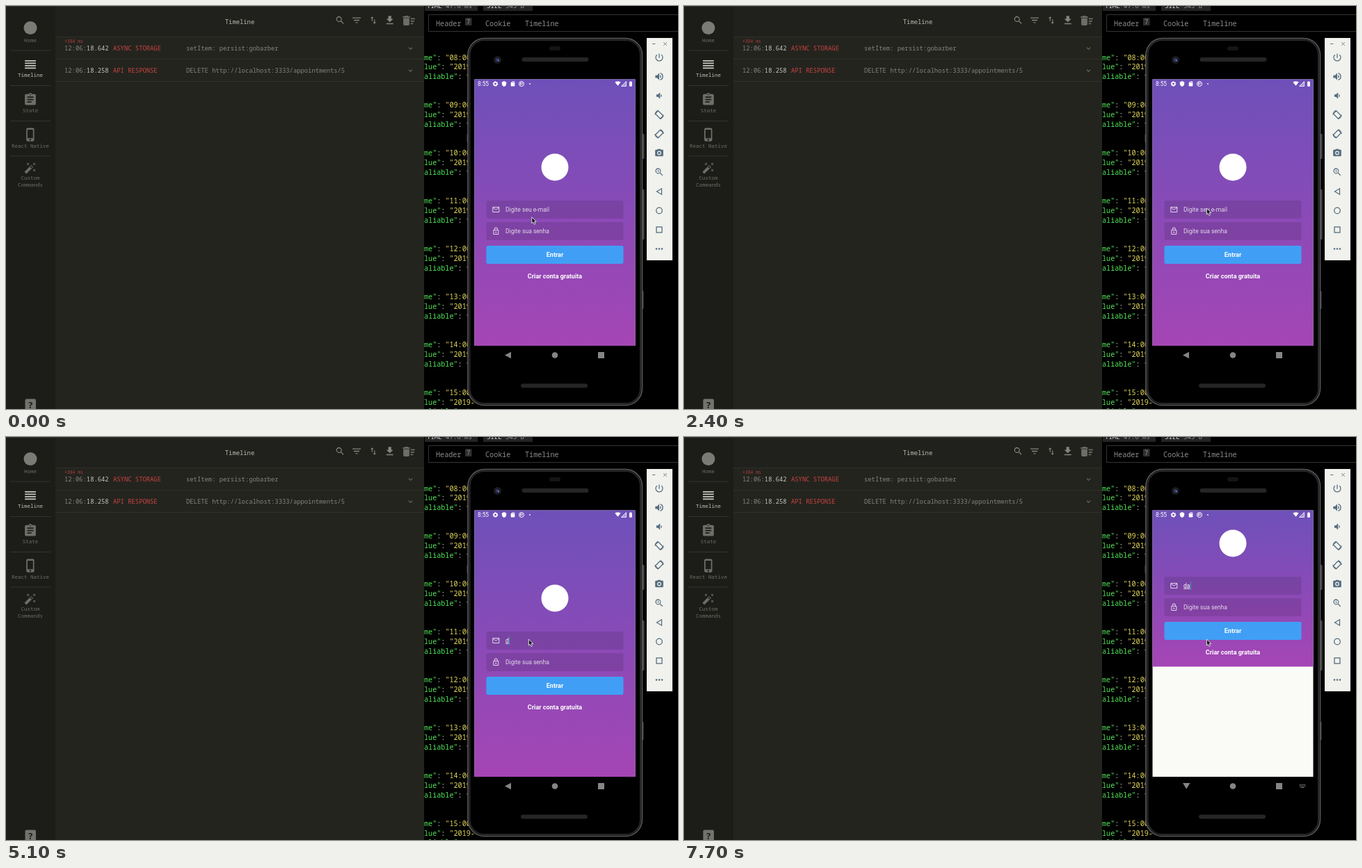
Write an HTML page that moves like this. It is 966 by 580 pixels and loops after 8000 ms.

```html
<!DOCTYPE html>
<html lang="pt">
<head>
<meta charset="utf-8">
<style>
  html, body { margin: 0; width: 100%; height: 100%; overflow: hidden; background: #000; }
  svg { display: block; }
  text { white-space: pre; }
  .mono { font-family: "Noto Sans Mono", monospace; }
  .app { font-family: Roboto, sans-serif; }
</style>
</head>
<body>
<svg id="stage" width="966" height="580" viewBox="0 0 966 580"></svg>
<script>
const ICONS = {
  search: 'M15.5 14h-.8l-.3-.3A6.5 6.5 0 1 0 13.7 14.4l.3.3v.8l5 5 1.5-1.5zm-6 0a4.5 4.5 0 1 1 0-9 4.5 4.5 0 0 1 0 9z',
  filter: 'M10 18h4v-2h-4zM3 6v2h18V6zm3 7h12v-2H6z',
  sort: 'M16 17v-7h-2v7h-3l4 4 4-4zM9 3L5 7h3v7h2V7h3z',
  download: 'M19 9h-4V3H9v6H5l7 7zM5 18v2h14v-2z',
  clear: 'M15 16h4v2h-4zm0-8h7v2h-7zm0 4h6v2h-6zM3 18a2 2 0 0 0 2 2h6a2 2 0 0 0 2-2V8H3zM14 5h-3l-1-1H6L5 5H2v2h12z',
  lines: 'M3 15h18v-2H3zm0 4h18v-2H3zm0-8h18V9H3zm0-6v2h18V5z',
  clipboard: 'M19 3h-4.2a3 3 0 0 0-5.6 0H5a2 2 0 0 0-2 2v14a2 2 0 0 0 2 2h14a2 2 0 0 0 2-2V5a2 2 0 0 0-2-2zm-7 0a1 1 0 1 1 0 2 1 1 0 0 1 0-2zm2 14H7v-2h7zm3-4H7v-2h10zm0-4H7V7h10z',
  phone: 'M15.5 1h-8A2.5 2.5 0 0 0 5 3.5v17A2.5 2.5 0 0 0 7.500 23h8a2.500 2.500 0 0 0 2.500-2.500v-17A2.500 2.500 0 0 0 15.500 1zm-4 21a1.500 1.500 0 1 1 0-3 1.500 1.500 0 0 1 0 3zM16 18H7V4h9z',
  wand: 'M7.5 5.600L10 7 8.600 4.500 10 2 7.500 3.400 5 2l1.400 2.500L5 7zm12 9.800L17 14l1.400 2.500L17 19l2.500-1.400L22 19l-1.400-2.500L22 14zM22 2l-2.500 1.400L17 2l1.400 2.500L17 7l2.500-1.400L22 7l-1.400-2.500zM14.400 7.300a1 1 0 0 0-1.400 0L1.300 19a1 1 0 0 0 0 1.400l2.300 2.300a1 1 0 0 0 1.400 0L16.700 11a1 1 0 0 0 0-1.400zm-1 5.500l-2.200-2.100 2.500-2.500 2.100 2.100z',
  chevron: 'M16.600 8.600L12 13.200 7.400 8.600 6 10l6 6 6-6z',
  mail: 'M20 4H4a2 2 0 0 0-2 2v12a2 2 0 0 0 2 2h16a2 2 0 0 0 2-2V6a2 2 0 0 0-2-2zm0 14H4V8l8 5 8-5zm-8-7L4 6h16z',
  lock: 'M12 17a2 2 0 1 0 0-4 2 2 0 0 0 0 4zm6-9h-1V6A5 5 0 0 0 7 6v2H6a2 2 0 0 0-2 2v10a2 2 0 0 0 2 2h12a2 2 0 0 0 2-2V10a2 2 0 0 0-2-2zM8.900 6a3.100 3.100 0 0 1 6.200 0v2H8.900zM18 20H6V10h12z',
  power: 'M13 3h-2v10h2zm4.800 2.200l-1.400 1.400A7 7 0 1 1 7.600 6.600L6.200 5.200a9 9 0 1 0 11.600 0z',
  louder: 'M3 9v6h4l5 5V4L7 9zm13.500 3A4.500 4.500 0 0 0 14 8v8a4.500 4.500 0 0 0 2.500-4zM14 3.200v2.100a7 7 0 0 1 0 13.400v2.100a9 9 0 0 0 0-17.600z',
  quieter: 'M18.500 12A4.500 4.500 0 0 0 16 8v8a4.500 4.500 0 0 0 2.500-4zM5 9v6h4l5 5V4L9 9z',
  camera: 'M9 2L7.200 4H4a2 2 0 0 0-2 2v12a2 2 0 0 0 2 2h16a2 2 0 0 0 2-2V6a2 2 0 0 0-2-2h-3.200L15 2zm3 15a5 5 0 1 1 0-10 5 5 0 0 1 0 10zm0-8a3 3 0 1 0 0 6 3 3 0 0 0 0-6z',
  plus: 'M12.500 10H10v2.500H9V10H6.500V9H9V6.500h1V9h2.500z',
  shield: 'M12 1L3 5v6c0 5.600 3.800 10.700 9 12 5.200-1.300 9-6.400 9-12V5z',
  card: 'M18 2h-8L4 8v12a2 2 0 0 0 2 2h12a2 2 0 0 0 2-2V4a2 2 0 0 0-2-2zM10 8V5h2v3zm3 0V5h2v3zm3 0V5h2v3z',
  wifi: 'M12 21.500L23.600 7C19 2.500 5 2.500.4 7z',
  battery: 'M15.700 4H14V2h-4v2H8.300A1.300 1.300 0 0 0 7 5.300v15.400A1.300 1.300 0 0 0 8.300 22h7.400a1.300 1.300 0 0 0 1.300-1.300V5.300A1.300 1.300 0 0 0 15.700 4z'
};

const rect = (x, y, w, h, fill, more = '') =>
  `<rect x="${x}" y="${y}" width="${w}" height="${h}" fill="${fill}" ${more}/>`;
const circle = (x, y, r, fill, more = '') =>
  `<circle cx="${x}" cy="${y}" r="${r}" fill="${fill}" ${more}/>`;
const path = (d, fill, more = '') => `<path d="${d}" fill="${fill}" ${more}/>`;
const text = (x, y, size, fill, body, more = '') =>
  `<text x="${x}" y="${y}" font-size="${size}" fill="${fill}" ${more}>${body}</text>`;
const span = (fill, body, more = '') => `<tspan fill="${fill}" ${more}>${body}</tspan>`;
const icon = (name, x, y, size, fill) =>
  path(ICONS[name], fill, `fill-rule="evenodd" transform="translate(${x} ${y}) scale(${size / 24}) translate(-12 -12)"`);
const middle = 'text-anchor="middle"';

function logPanel() {
  const dim = '#6e6e69', grey = '#85857e', red = '#c9443f';
  const label = (y, body, fill = dim) => text(35, y, 7.5, fill, body, middle);
  const row = (y, seconds, kind, message) =>
    text(84, y, 8.86, grey, '12:06:' + span('#c6c6be', seconds, 'font-weight="500"')) +
    text(154, y, 8.86, red, kind) + text(259, y, 8.86, grey, message) +
    icon('chevron', 581.5, y - 2.5, 12, dim);
  return `<g class="mono">` +
    rect(0, 0, 601, 580, '#24241f') + rect(71, 0, 530, 44, '#20201c') +
    rect(0, 0, 71, 580, '#1c1c18') + rect(0, 0, 601, 1, '#393935') +
    [63.5, 114, 165, 215.5].map(y => rect(6, y, 58, 1, '#34342f')).join('') +
    [44, 76, 108].map(y => rect(71, y, 530, 1, '#2f2f2a')).join('') +
    circle(35, 31.5, 9.5, '#7b7b76') + label(51.5, 'Home') +
    icon('lines', 35, 84, 21, '#c8c8c1') + label(102, 'Timeline', '#c3c3bc') +
    icon('clipboard', 35, 134.5, 21, dim) + label(152.5, 'State') +
    icon('phone', 35.3, 185, 21, dim) + label(203.5, 'React Native') +
    icon('wand', 35, 233, 18, dim) + label(250, 'Custom') + label(260, 'Commands') +
    rect(27.5, 565.5, 15.5, 18, '#73736e', 'rx="2"') +
    text(35.2, 578.5, 13, '#1c1c18', '?', middle + ' font-weight="700"') +
    text(336, 25.5, 8.86, '#bcbcb5', 'Timeline', middle) +
    icon('search', 480.3, 20.500, 15, grey) + icon('filter', 504, 20.500, 16, grey) +
    icon('sort', 528, 20.500, 14, grey) + icon('download', 551.700, 20.500, 17, grey) +
    icon('clear', 579, 21, 21, dim) +
    text(84, 53, 6.4, '#b03f3b', '+384 ms') +
    row(63.5, '18.642', 'ASYNC STORAGE', 'setItem: persist:gobarber') +
    row(95.5, '18.258', 'API RESPONSE', 'DELETE http://localhost:3333/appointments/5') + '</g>';
}

function responsePanel() {
  const line = (y, key, value) =>
    text(601, y, 10.15, '#52e357', key + '"' + span('#d5d5d0', ': ') + span('#e2d65c', value));
  let out = rect(601, 0, 365, 580, '#000') +
    rect(602, -4, 76, 11, '#242424') + rect(686, -4, 71, 11, '#242424') +
    text(605, 2.500, 9, '#ddd', 'TIME ' + span('#999', '47.6 ms')) +
    text(691, 2.500, 9, '#ddd', 'SIZE ' + span('#999', '543 B')) +
    path('M966 12.500H607.500V36.500H966', 'none', 'stroke="#343434"') +
    rect(660, 17, 9.500, 11, '#303030', 'rx="1"') + text(664.700, 25.500, 8, '#999', '7', middle);
  ['Header', 'Cookie', 'Timeline'].forEach((tab, i) =>
    out += text([618, 689, 746][i], 28.500, 10.15, '#8b8b8b', tab));
  for (let i = 0; i < 8; i++) {
    const y = 77.500 + i * 68.900, hour = String(8 + i).padStart(2, '0');
    out += line(y, 'me', `"${hour}:00"`) + line(y + 13.800, 'lue', '"2019-') + line(y + 27.600, 'aliable', 'true');
  }
  return `<g class="mono">${out}</g>`;
}

function phoneBody() {
  return [[914, 184, 36], [914, 264, 72], [913, 410, 26], [662.500, 184, 12]]
      .map(([x, y, h]) => rect(x, y, 3.500, h, '#484848', 'rx="1"')).join('') +
    rect(664, 46.500, 250.500, 528, '#080808', 'rx="24" stroke="#5c5c5c" stroke-width="1.500"') +
    rect(666.500, 49, 245.500, 523, '#000', 'rx="21" stroke="#292929" stroke-width="2"') +
    rect(741.500, 74, 96, 6, '#252525', 'rx="3"') + rect(740, 543.500, 96, 6, '#252525', 'rx="3"') +
    rect(781, 58, 16, 6, '#151515', 'rx="3"') +
    circle(706.500, 77.500, 5.500, '#1b1b22') + circle(706.500, 77.500, 2.500, '#343b70') + circle(708, 78.500, 1, '#8288ad');
}

function statusBar() {
  const white = '#fff';
  return text(678, 115, 8.300, white, '8:55') +
    circle(703.500, 112, 2.300, 'none', 'stroke="#fff" stroke-width="1.600"') +
    circle(703.500, 112, 3.400, 'none', 'stroke="#fff" stroke-dasharray="1.780"') +
    icon('shield', 716, 112, 8.500, white) + icon('card', 728.500, 112, 8.500, white) +
    circle(741, 112, 3.500, 'none', 'stroke="#fff"') +
    path('M739.500 113.500V110.500H741.500A1 1 0 0 1 741.500 112.500H739.500', 'none', 'stroke="#fff" stroke-width=".9"') +
    circle(753, 112, .9, white) + icon('wifi', 879.500, 111.500, 8.500, white) +
    path('M891.500 108.500V115.500H884.500Z', '#fff6', 'stroke="#fff" stroke-width=".8"') + icon('battery', 898, 112, 9, white);
}

function loginForm() {
  const soft = '#ffffffc8';
  const field = (y, name) => rect(690.500, y, 197, 26, '#0000001c', 'rx="2.500"') + icon(name, 704.300, y + 13, 12, soft);
  return `<g id="form">` + circle(789, 232, 19.500, '#fff') +
    field(280, 'mail') + field(311, 'lock') +
    text(718, 295.800, 8.550, soft, '', 'id="email"') +
    rect(718, 287, 1, 12, '#2f9d9b', 'id="caret"') +
    text(718, 327, 8.550, soft, 'Digite sua senha') +
    rect(690.500, 345, 197, 26, '#409ff5', 'rx="2.500"') +
    text(789, 361.300, 9, '#fff', 'Entrar', middle + ' font-weight="700"') +
    text(789, 391.500, 9, '#fff', 'Criar conta gratuita', middle + ' font-weight="700"') + '</g>';
}

function navigation() {
  const grey = '#858585';
  return path('', grey, 'id="back"') + circle(789, 502.500, 4.300, grey) + rect(851, 498, 9, 9, grey) +
    `<g id="keyboard">` + path('M884.500 500.500H893.500M884.500 502.500H893.500', 'none', 'stroke="#858585" stroke-dasharray="1.200 .4"') +
    rect(886.500, 504, 5, 1, grey) + '</g>';
}

function emulatorBar() {
  const ink = '#566d80', stroke = `stroke="${ink}" stroke-width="1.300"`;
  const rotate = (y, flip) => `<g transform="translate(939 ${y}) scale(${flip} 1)" fill="none" ${stroke}>` +
    `<rect x="-3" y="-5" width="6" height="10" rx="1" transform="rotate(-45)"/>` +
    `<path d="M-6 0A6 6 0 0 1-1-6M6 0A6 6 0 0 1 1 6"/></g>`;
  return rect(921, 46, 37, 320, '#f1f2ed') +
    path('M929 54.500H933.500M945.300 52.300L949.700 56.700M949.700 52.300L945.300 56.700', 'none', 'stroke="#777"') +
    icon('power', 939, 74, 15, ink) + icon('louder', 939, 101.500, 15, ink) + icon('quieter', 939, 129, 14, ink) +
    rotate(156.500, 1) + rotate(184, -1) +
    icon('camera', 939, 211.500, 14, ink) + icon('search', 939, 239, 15, ink) + icon('plus', 939, 239, 15, ink) +
    path('M942.500 262.800V271.200L935.500 267Z', 'none', stroke) + circle(939, 294.500, 4.300, 'none', stroke) +
    rect(935, 318, 8, 8, 'none', stroke) + [935, 939, 943].map(x => circle(x, 349.500, 1.300, ink)).join('');
}

stage.innerHTML = `<defs><linearGradient id="violet" x2="0" y2="1">
  <stop stop-color="#6e50b9"/><stop offset="1" stop-color="#a545b5"/></linearGradient></defs>` +
  responsePanel() + logPanel() + phoneBody() + '<g class="app">' +
  rect(673.500, 105.500, 231, 383.500, '#fafbf6') + rect(673.500, 105.500, 231, 383.500, 'url(#violet)', 'id="backdrop"') +
  statusBar() + loginForm() + '</g>' + navigation() + emulatorBar() +
  path('M0 0V9L2 7.200 3.600 10.500 5.200 9.700 3.700 6.500H6.300Z', '#111', 'id="pointer" stroke="#fff" stroke-width=".8"');

const [email, caret, form, backdrop, back, keyboard, pointer] =
  ['email', 'caret', 'form', 'backdrop', 'back', 'keyboard', 'pointer'].map(id => document.getElementById(id));
const CARET_TOGGLES = [800, 1500, 1900, 2400, 2900, 3500, 3900, 4400, 4900, 6900, 7700];

function draw(t) {
  const typed = t < 5100 ? '' : t < 6300 ? 'd' : 'da';
  email.textContent = typed || 'Digite seu e-mail';
  email.setAttribute('fill', typed ? '#fff' : '#ffffffc8');
  email.setAttribute('text-decoration', typed ? 'underline' : 'none');
  caret.setAttribute('x', [718, 723, 728][typed.length]);
  caret.setAttribute('opacity', CARET_TOGGLES.filter(at => t >= at).length % 2);

  const raised = t >= 6900;
  form.setAttribute('transform', `translate(0 ${raised ? -79 : 0})`);
  backdrop.setAttribute('height', raised ? 225 : 383.5);
  keyboard.setAttribute('opacity', t >= 5600 ? 1 : 0);
  back.setAttribute('d', t >= 5800 ? 'M717 498H727.500L722.200 506.500Z' : 'M726 497.700V507.300L717 502.500Z');

  const move = Math.min(1, Math.max(0, (Math.floor(t / 100) - 2) / 5));
  pointer.setAttribute('transform', `translate(${755.8 - 4.4 * move} ${303.8 - 12.8 * move})`);
}

const start = performance.now();
function tick() {
  draw((performance.now() - start) % 8000);
  requestAnimationFrame(tick);
}
tick();
</script>
</body>
</html>
```
